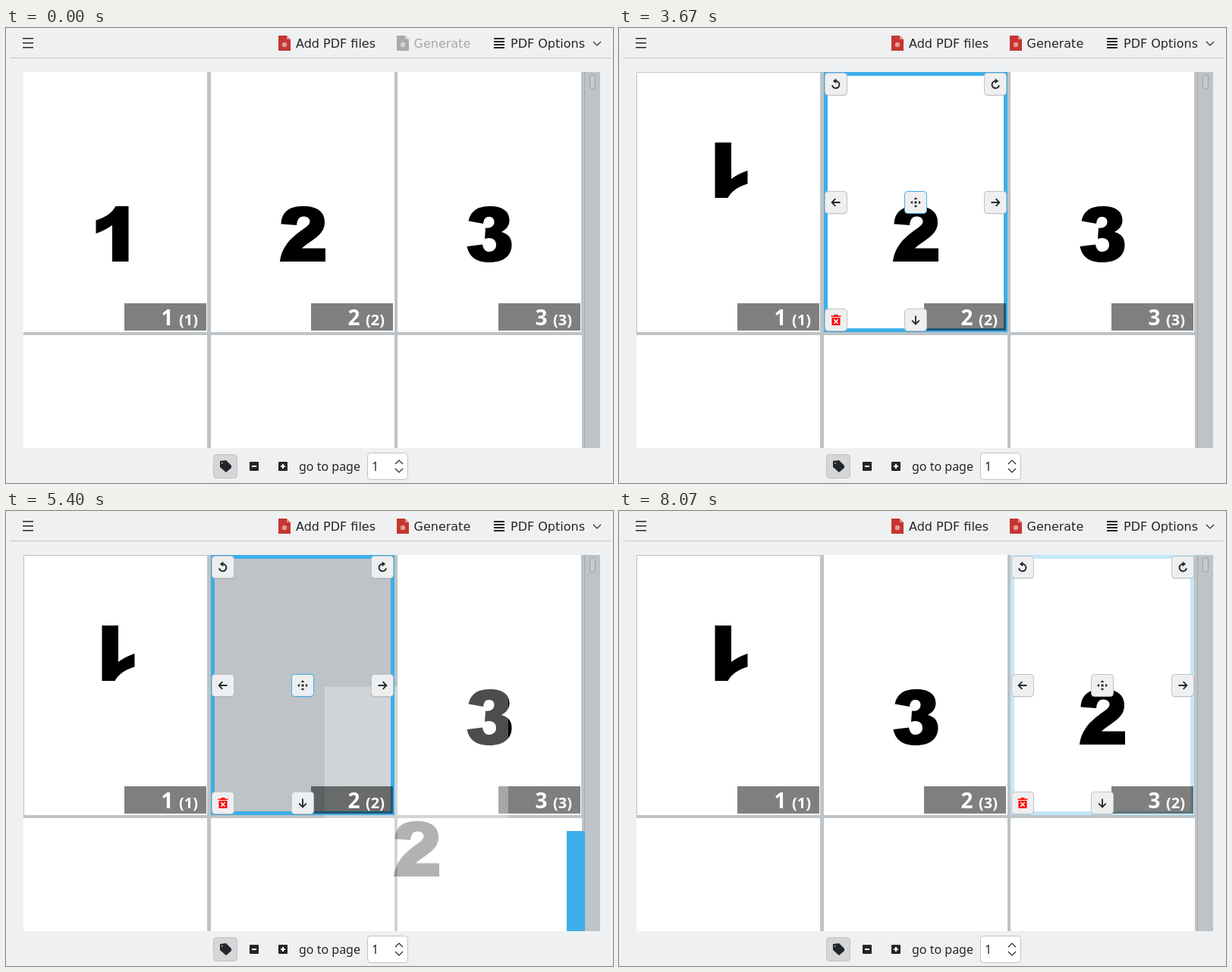
An HTML page with a canvas for the animation above (8200 ms loop, 800x600 px).

```html
<!DOCTYPE html>
<html lang="en">
<head>
<meta charset="utf-8">
<title>Page arranger</title>
<style>
html, body { margin: 0; width: 100%; height: 100%; overflow: hidden; background: #eff0f1; }
canvas { display: block; }
</style>
</head>
<body>
<canvas id="stage" width="800" height="600"></canvas>
<script>
const ctx = document.getElementById('stage').getContext('2d');
const LOOP = 8200, STEP = 200 / 3;
const INK = '#232629', GRID = '#bdc3c7', BLUE = '#3daee9', EDGE = '#bfc1c3';
const COLS = [23, 269.6, 516.3], TOP = 58, PAGE_W = 242, PAGE_H = 343;

// Heavy numerals: offset inside the page, then outline
const DIGITS = {
  1: [95.5, 177, 'M43 0V73H21.5V25Q12 32 0 36V18.5Q19 13 26 0Z'],
  2: [91, 177, 'M60 73H0C1 64 4 57 9 50C13 44 21 37 31 30C37 26 39.5 23 39.5 20C39.5 16 36 13.5 31 13.5C26 13.5 23 16.5 22 25L1.5 23.5C2.5 8 11 0 31 0C50 0 59 8 59 21C59 32 53 38 40 47C34 51 31 53.5 29 55.5H60Z'],
  3: [91.5, 177, 'M21.5 23L2 19.5C5 6 14 0 30 0C48 0 56 7.5 56 18.5C56 25.5 52 30.5 45.5 34C54.5 36.5 59 42 59 51C59 65 48.5 74 30 74C12 74 3 67 0 53L20.5 50.5C22 57.5 24.5 60 29.5 60C34.5 60 38.5 56.5 38.5 51C38.5 45.5 35 42 29.5 42C27.5 42 26 42.3 23.5 43L24.5 28.5C25.5 28.7 26.5 28.7 27 28.7C32 28.7 36 25.5 36 21C36 16.5 33.5 14 29 14C24.5 14 22.5 16.5 21.5 23Z']
};
for (const digit of Object.values(DIGITS)) digit[2] = new Path2D(digit[2]);

// Drag path of the page corner: time, x, y
const DRAG = [
  [4067, 271, 63], [4333, 287, 140], [4600, 302, 225], [4867, 306, 246],
  [5067, 335, 247], [5400, 420, 232], [5733, 479, 141], [5933, 488, 130]
];

function dragPosition(t) {
  const i = DRAG.findIndex(k => k[0] > t);
  if (i < 0) return DRAG[DRAG.length - 1].slice(1);
  const a = DRAG[Math.max(i - 1, 0)], b = DRAG[i];
  const p = Math.max(0, (t - a[0]) / (b[0] - a[0]));
  return [a[1] + (b[1] - a[1]) * p, a[2] + (b[2] - a[2]) * p];
}

function rect(color, x, y, w, h) {
  ctx.fillStyle = color;
  ctx.fillRect(x, y, w, h);
}

function box(x, y, w, h, fill, edge, r = 4) {
  ctx.beginPath();
  ctx.roundRect(x + .5, y + .5, w - 1, h - 1, r);
  ctx.fillStyle = fill;
  ctx.fill();
  ctx.lineWidth = 1;
  ctx.strokeStyle = edge;
  ctx.stroke();
}

function text(str, x, y, font, color = INK) {
  ctx.font = font;
  ctx.fillStyle = color;
  ctx.fillText(str, x, y);
}

function at(x, y, draw) {
  ctx.save();
  ctx.translate(x, y);
  draw();
  ctx.restore();
}

function stroke(d, width, color = INK) {
  ctx.lineWidth = width;
  ctx.strokeStyle = color;
  ctx.stroke(new Path2D(d));
}

function fill(d, color = INK) {
  ctx.fillStyle = color;
  ctx.fill(new Path2D(d));
}

const icons = {
  rotateLeft() {
    stroke('M-.5 -4A4.7 4.7 0 1 1 -4.9 1.5', 2);
    fill('M.3 -7.5V-.8L-4.2 -4.1Z');
  },
  rotateRight() { ctx.scale(-1, 1); icons.rotateLeft(); },
  right() { stroke('M-5.5 0H5M.7 -4.8L5.4 0L.7 4.8', 1.8); },
  left() { ctx.scale(-1, 1); icons.right(); },
  down() { ctx.rotate(Math.PI / 2); icons.right(); },
  move() {
    rect(INK, -1.5, -1.5, 3, 3);
    for (let i = 0; i < 4; i++) {
      fill('M0 -7L2.3 -4H-2.3Z');
      ctx.rotate(Math.PI / 2);
    }
  },
  trash() {
    fill('M-6.5 -5.5H-3L-2 -7H2L3 -5.5H6.5V-4H-6.5ZM-5.5 -3H5.5V7H-5.5Z', '#f00');
    stroke('M-2.7 -.7L2.7 4.7M2.7 -.7L-2.7 4.7', 1.6, '#fff');
  }
};

function button(icon, x, y, state) {
  x = Math.round(x);
  box(x, y + 1, 30, 30, 'rgba(0,0,0,.08)', 'rgba(0,0,0,.04)');
  box(x, y, 30, 30, state === 'pressed' ? '#b6d9ee' : '#eeeff1', state ? BLUE : EDGE);
  at(x + 15, y + 15, icons[icon]);
}

function page(number, x, y, angle = 0) {
  at(x + PAGE_W / 2, y + PAGE_H / 2, () => {
    const scale = angle === 90 ? PAGE_W / PAGE_H : 1;
    ctx.rotate(angle * Math.PI / 180);
    ctx.scale(scale, scale);
    ctx.translate(-PAGE_W / 2, -PAGE_H / 2);
    rect('#fff', 0, 0, PAGE_W, PAGE_H);
    const [dx, dy, outline] = DIGITS[number];
    ctx.translate(dx, dy);
    ctx.fillStyle = '#000';
    ctx.fill(outline);
  });
  if (angle === 180) {
    rect(GRID, x, y, PAGE_W, 1);
    rect(GRID, x, y, 1, PAGE_H);
  }
}

function label(index, number, x) {
  x = Math.round(x + 132.6);
  rect('rgba(0,0,0,.5)', x, 363, 108, 36);
  text(index, x + 48.5, 392, 'bold 28px "Noto Sans", sans-serif', '#fff');
  text(`(${number})`, x + 72, 392, 'bold 20px "Noto Sans", sans-serif', '#fff');
}

function selectionFrame(x, alpha) {
  ctx.globalAlpha = alpha;
  ctx.lineWidth = 5;
  ctx.strokeStyle = BLUE;
  ctx.strokeRect(Math.round(x) + 2.5, TOP + 2.5, PAGE_W - 5, PAGE_H - 5);
  ctx.globalAlpha = 1;
}

function pageButtons(x, hasLeft, states) {
  const [left, middle, right] = [x + 1, x + 106, x + 211.6];
  button('rotateLeft', left, 59);
  button('rotateRight', right, 59, states.rotateRight);
  if (hasLeft) button('left', left, 215);
  button('move', middle, 215, states.move);
  button('right', right, 215);
  button('trash', left, 370);
  button('down', middle, 370);
}

function cell(c) {
  const x = Math.round(c.x);
  if (c.dragged) {
    rect(GRID, x, TOP, PAGE_W, PAGE_H);
    ctx.globalAlpha = .3;
    page(c.number, ...c.dragged);
    ctx.globalAlpha = 1;
  } else {
    page(c.number, x, TOP, c.angle);
  }
  if (c.selected) selectionFrame(c.x, c.selected);
  label(c.index, c.number, c.x);
  if (c.selected) pageButtons(c.x, c.index > 1, c.states);
}

function documentIcon(x, color) {
  at(x, 10, () => {
    fill('M0 0H11L16 5V20H0Z', color);
    fill('M11 0L16 5H11Z', 'rgba(255,255,255,.45)');
    ctx.beginPath();
    ctx.arc(8, 12, 3.2, 0, 7);
    ctx.fillStyle = 'rgba(255,255,255,.5)';
    ctx.fill();
  });
}

function toolbar(enabled) {
  const font = '16px "DejaVu Sans", sans-serif', red = '#c63531';
  for (const y of [13, 19, 25]) rect(INK, 22, y, 14, 1.5);
  documentIcon(359, red);
  text('Add PDF files', 382, 26, font);
  documentIcon(515, enabled ? red : '#a9aaab');
  text('Generate', 537.5, 26, font, enabled ? INK : '#a5a7a9');
  for (const y of [13, 17, 21, 25]) rect(INK, 643, y, 14, 2);
  text('PDF Options', 665, 26, font);
  stroke('M774 18L779 23L784 18', 1.1);
  rect('#c3c5c6', 5, 39, 792, 1);
}

function bottomBar() {
  const font = '16px "Noto Sans", sans-serif';
  box(273, 562, 32, 32, '#d4d6d8', EDGE);
  fill('M282 571L290 570L297 577V580L290 586L282 579Z');
  rect('#d4d6d8', 284, 573, 1.5, 1.5);
  for (const x of [321, 359]) {
    ctx.beginPath();
    ctx.roundRect(x, 572, 12, 12, 1);
    ctx.fillStyle = INK;
    ctx.fill();
    rect('#fff', x + 3, 577, 6, 2);
  }
  rect('#fff', 364, 575, 2, 6);
  text('go to page', 386, 584, font);
  box(476, 560, 54, 36, '#fff', EDGE);
  text('1', 482, 584, font);
  stroke('M513 575L518 570L523 575M513 581L518 586L523 581', 1.2);
}

function scrollbar() {
  rect(GRID, 763, TOP, 20, 496);
  rect('#a4aaad', 762, TOP, 1, 496);
  box(769, 61, 8, 20, '#c5cacd', '#9ba1a4');
}

function dropBar([x, y]) {
  const column = x + PAGE_W / 2 < COLS[2] ? 1 : 2;
  const lower = y > 222;
  if (!lower && column === 1) return;
  rect(BLUE, column === 1 ? 492 : 739, lower ? 422 : 75, 24, 309);
}

function buttonStates(t) {
  const during = (a, b) => t >= a && t < b;
  return {
    rotateRight: during(1730, 1800) || during(2270, 2400) ? 'pressed' : during(1330, 2730) && 'hover',
    move: during(3530, 6200) && 'hover'
  };
}

function draw(t) {
  const tick = Math.floor((t + 5) / STEP) * STEP;
  const dragged = t >= 4065 && t < 6195 ? dragPosition(tick) : null;
  const dropped = t >= 6195;
  const slide = dropped ? Math.min(1, Math.max(0, (tick - 6133) / 333)) : 0;
  const shift = (COLS[2] - COLS[1]) * slide;
  const selected = t < 870 ? 0 : t < 3330 ? 1 : 2;
  const states = buttonStates(t);

  rect('#eff0f1', 0, 0, 800, 600);
  toolbar(t >= 1800);
  bottomBar();

  ctx.save();
  ctx.beginPath();
  ctx.rect(23, TOP, 760, 496);
  ctx.clip();
  rect(GRID, 23, TOP, 760, 496);
  for (const x of COLS) rect('#fff', Math.round(x), 405, x > 500 ? 243 : PAGE_W, 149);
  scrollbar();
  cell({
    number: 1, index: 1, x: COLS[0], selected: +(selected === 1), states,
    angle: t < 1800 ? 0 : t < 2400 ? 90 : 180
  });
  cell({ number: 3, index: dropped ? 2 : 3, x: COLS[2] - shift });
  if (dragged) dropBar(dragged);
  cell({
    number: 2, index: dropped ? 3 : 2, x: COLS[1] + shift, dragged, states,
    selected: selected !== 2 ? 0 : t < 8070 ? 1 : .3
  });
  ctx.restore();
}

function frame() {
  draw(performance.now() % LOOP);
  requestAnimationFrame(frame);
}
frame();
</script>
</body>
</html>
```
